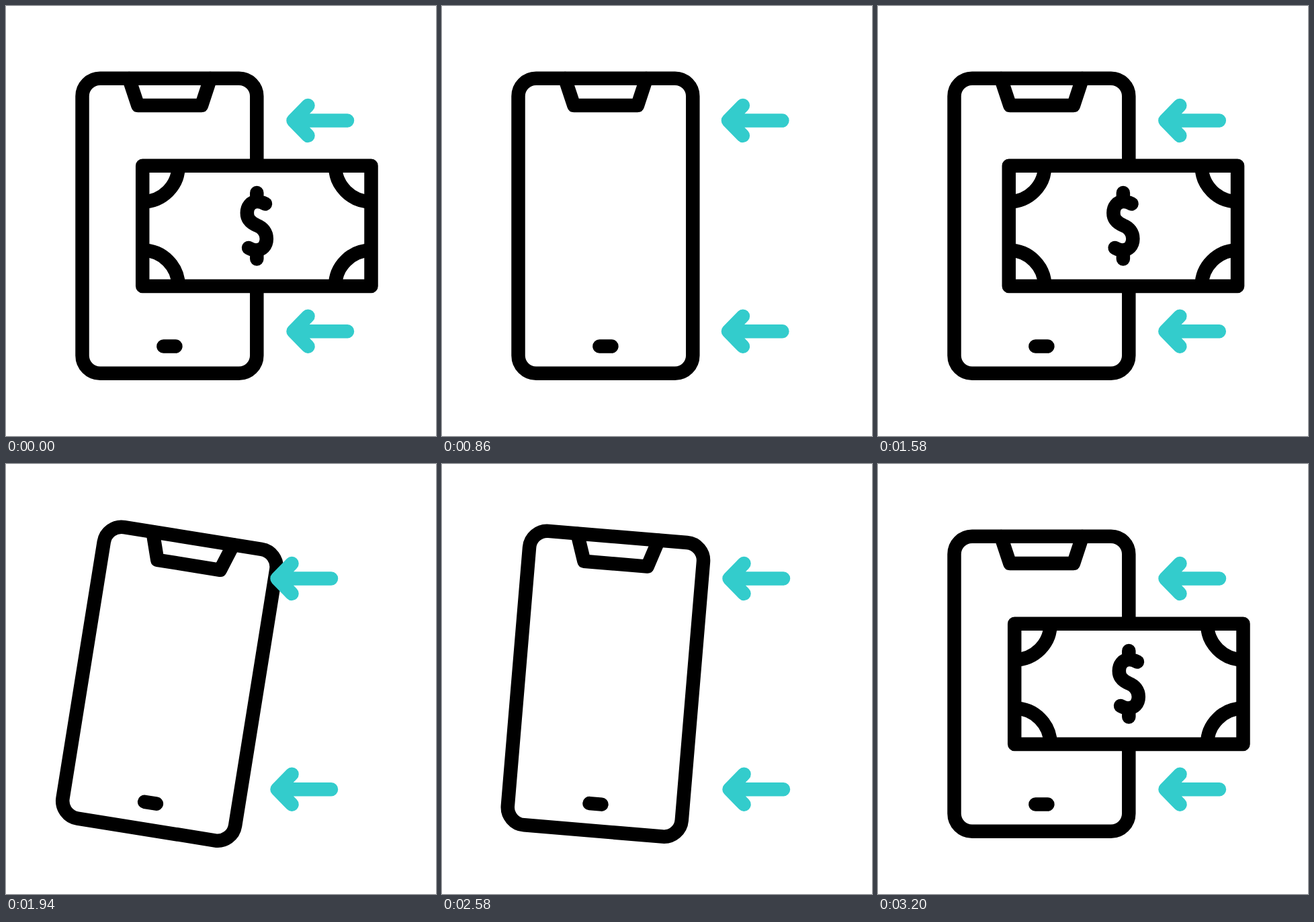
Animation of 640x640 px, one loop 3.62 s. Source, as an HTML page:

```html
<!DOCTYPE html>
<html lang="en">
<head>
<meta charset="utf-8">
<title>Mobile payment</title>
<style>
  html, body { margin: 0; width: 100%; height: 100%; overflow: hidden; background: #fff; }
  svg { display: block; width: 100%; height: 100%; }
</style>
</head>
<body>
<svg viewBox="0 0 640 640" fill="none" stroke="#000" stroke-width="20.5" stroke-linecap="round" stroke-linejoin="round">
  <defs>
    <clipPath id="slot"><path d="M148 200H640V460H148Z"/></clipPath>
    <path id="arrow" d="M449.5 148L427.5 170.5L449.5 193M428 170.5H508"/>
    <path id="corner" stroke-linecap="butt" d="M256.7 237.8A53.5 53.5 0 0 1 203.2 291.3"/>
  </defs>
  <g id="phone">
    <rect x="113.5" y="107.7" width="259.8" height="439" rx="26.5"/>
    <path d="M183 108L196.3 148H291L304.2 108M234.4 506.5H252.4"/>
  </g>
  <g clip-path="url(#slot)">
    <g id="bill">
      <rect x="203.2" y="237.8" width="340.3" height="179.2" fill="#fff"/>
      <use href="#corner"/>
      <use href="#corner" transform="matrix(-1 0 0 1 746.7 0)"/>
      <use href="#corner" transform="matrix(1 0 0 -1 0 654.8)"/>
      <use href="#corner" transform="matrix(-1 0 0 -1 746.7 654.8)"/>
      <path d="M373.3 278V290M373.3 364V376.5M386 294.5C382 292.5 378 291 374 291C364 291 358.8 299 358.8 308C358.8 317 364 322.5 373.3 326.5C382 330 387.8 337 387.8 346.5C387.8 357 381 363.5 372 363.5C368 363.5 364.5 361.7 361 360"/>
    </g>
  </g>
  <g id="arrows" stroke="#33cccc">
    <use href="#arrow"/>
    <use href="#arrow" y="313.7"/>
  </g>
</svg>
<script>
const LOOP = 3620;
const [phone, bill, arrows] = ['phone', 'bill', 'arrows'].map(id => document.getElementById(id));

// Keys are [time, value]; two keys at one time make a jump.
const billKeys = [
  [347, 0], [747, -412], [800, -412], [800, 490], [1200, 0],
  [1547, 0], [1947, -412], [2800, -412], [2800, 490], [3200, 0]
];

const phoneKeys = [[1620, 0]];
for (let i = 0; i < 6; i++) phoneKeys.push([1714 + i * 260, i % 2 ? 10 : -10]);
phoneKeys.push([3140, 0]);

const arrowKeys = [];
for (let i = 0; i <= 6; i++) arrowKeys.push([i * 400, i % 2 ? -25.5 : 0]);

const smooth = x => x * x * (3 - 2 * x);

function valueAt(keys, t) {
  const next = keys.findIndex(key => key[0] > t);
  if (next < 0) return keys[keys.length - 1][1];
  if (next === 0) return keys[0][1];
  const [t0, v0] = keys[next - 1], [t1, v1] = keys[next];
  return v0 + (v1 - v0) * smooth((t - t0) / (t1 - t0));
}

function draw(t) {
  bill.setAttribute('transform', `translate(${valueAt(billKeys, t)})`);
  phone.setAttribute('transform', `rotate(${valueAt(phoneKeys, t)} 243.4 327.2)`);
  arrows.setAttribute('transform', `translate(${valueAt(arrowKeys, t)})`);
}

function tick() {
  draw((performance.now() - start) % LOOP);
  requestAnimationFrame(tick);
}

const start = performance.now();
tick();
</script>
</body>
</html>
```
